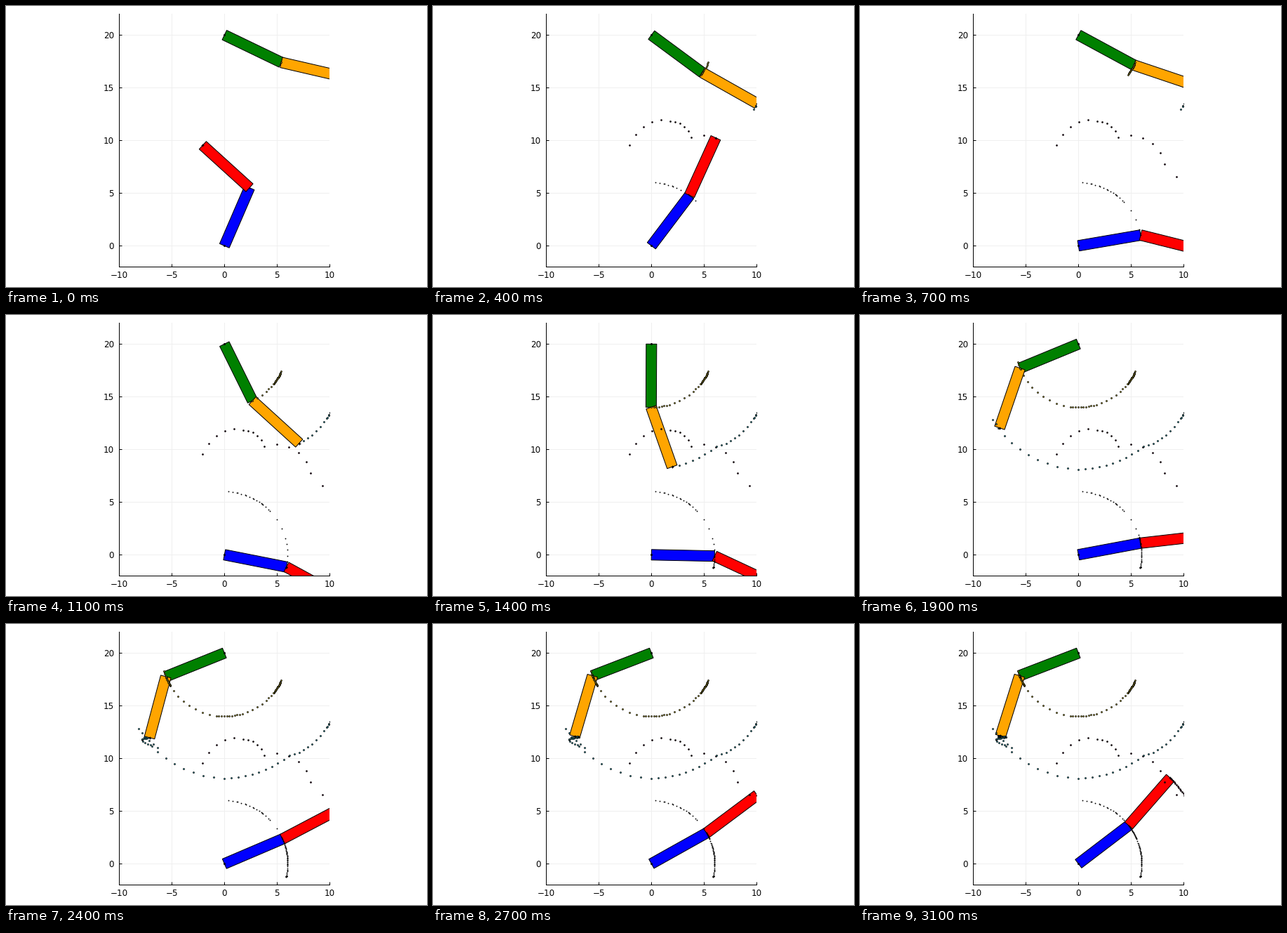
Recreate the animation shown at these times as a matplotlib script. Size 600 by 400 pixels, loop 3200 ms.

```python
import numpy as np
import matplotlib.pyplot as plt
from matplotlib.animation import FuncAnimation
from matplotlib.patches import Polygon

PX = 0.72            # one pixel in points at 100 dpi
LINK, HALF = 6.0, 0.5
FRAMES, STEPS = 32, 3

# Key poses, step: headings of both links, in degrees clockwise from up.
LOWER = {0: (23.4, -47.8), 5: (3.7, 13.2), 10: (44, -3.4), 15: (26.8, 66.3),
         20: (74.9, 100.3), 25: (101.8, 119), 35: (101, 118.5),
         50: (80, 111), 55: (72, 76.5), 60: (90.5, 94),
         72: (66.9, 62.3), 93: (52.7, 41.2)}
UPPER = {0: (115.7, 103), 10: (128.7, 123), 20: (117.3, 105),
         25: (122.8, 123), 30: (138.6, 133.5), 35: (163.7, 131.5),
         45: (187.4, 173), 55: (253.5, 203.5), 60: (238.8, 192)}


def headings(keys):
    """Both headings at every step, linear between the key poses."""
    steps = np.arange(FRAMES * STEPS)
    poses = np.array(list(keys.values()))
    return np.array([np.interp(steps, list(keys), col) for col in poses.T])


def settle(angles, start):
    """After the last key pose, ease to rest with a fading sway."""
    t = np.clip(np.arange(angles.shape[1]) - start, 0, None)
    rise = 1 - np.exp(-t / 6)
    sway = np.exp(-t / 15) * np.sin(np.pi * t / 11)
    return angles + np.outer((10.2, 5.5), rise) + np.outer((-4, 14), sway)


def vector(angle):
    rad = np.radians(angle)
    return LINK * np.column_stack([np.sin(rad), np.cos(rad)])


def corners(p, q):
    d = (q - p) / LINK
    n = HALF * np.array([-d[1], d[0]])
    return [p + n, q + n, q - n, p - n]


class Arm:
    def __init__(self, ax, base, angles, colors, dots):
        self.base = np.array(base, float)
        self.joint = self.base + vector(angles[0])
        self.tip = self.joint + vector(angles[1])
        self.bars = [Polygon(np.zeros((4, 2)), closed=True, fc=c, ec="black",
                             lw=PX, joinstyle="miter", zorder=3)
                     for c in colors]
        for bar in self.bars:
            ax.add_patch(bar)
        self.trails = [ax.plot([], [], "o", ms=size * PX, mfc=fill,
                               mec="black", mew=0.8 * PX, zorder=4)[0]
                       for size, fill in dots]
        ax.plot(*base, "o", ms=1.6 * PX, color="black", zorder=4)
        self.mark, = ax.plot([], [], "+", ms=5 * PX, mec="black",
                             mew=0.8 * PX, zorder=4)

    def pose(self, step):
        joint, tip = self.joint[step], self.tip[step]
        self.bars[0].set_xy(corners(self.base, joint))
        self.bars[1].set_xy(corners(joint, tip))
        for trail, path in zip(self.trails, (self.joint, self.tip)):
            trail.set_data(*path[:step + 1].T)
        self.mark.set_data([tip[0]], [tip[1]])


plt.rcParams["font.family"] = "DejaVu Sans"
fig = plt.figure(figsize=(6, 4), dpi=100, facecolor="white")
ax = fig.add_axes([161.3 / 600, 28.7 / 400, 300 / 600, 360 / 400])
ax.set(xlim=(-10, 10), ylim=(-2, 22),
       xticks=range(-10, 11, 5), yticks=range(0, 21, 5))
ax.set_axisbelow(True)
ax.grid(color="#efefef", lw=PX)
for side in ("top", "right"):
    ax.spines[side].set_visible(False)
for side in ("left", "bottom"):
    ax.spines[side].set_linewidth(PX)
ax.tick_params(direction="in", length=4 * PX, width=PX, labelsize=11.9 * PX)
ax.tick_params(axis="x", pad=6 * PX)
ax.tick_params(axis="y", pad=7.5 * PX)

arms = [
    Arm(ax, (0, 0), headings(LOWER), ("#0000ff", "#ff0000"),
        [(1.0, "black"), (1.8, "#40102c")]),
    Arm(ax, (0, 20), settle(headings(UPPER), max(UPPER)),
        ("#008000", "#ffa500"), [(1.9, "#c8b830"), (1.9, "#30b0c0")]),
]


def draw(frame):
    for arm in arms:
        arm.pose(frame * STEPS)
    return []


anim = FuncAnimation(fig, draw, frames=FRAMES, init_func=lambda: draw(0),
                     interval=100, repeat=True, repeat_delay=0, blit=False)
plt.show()
```
